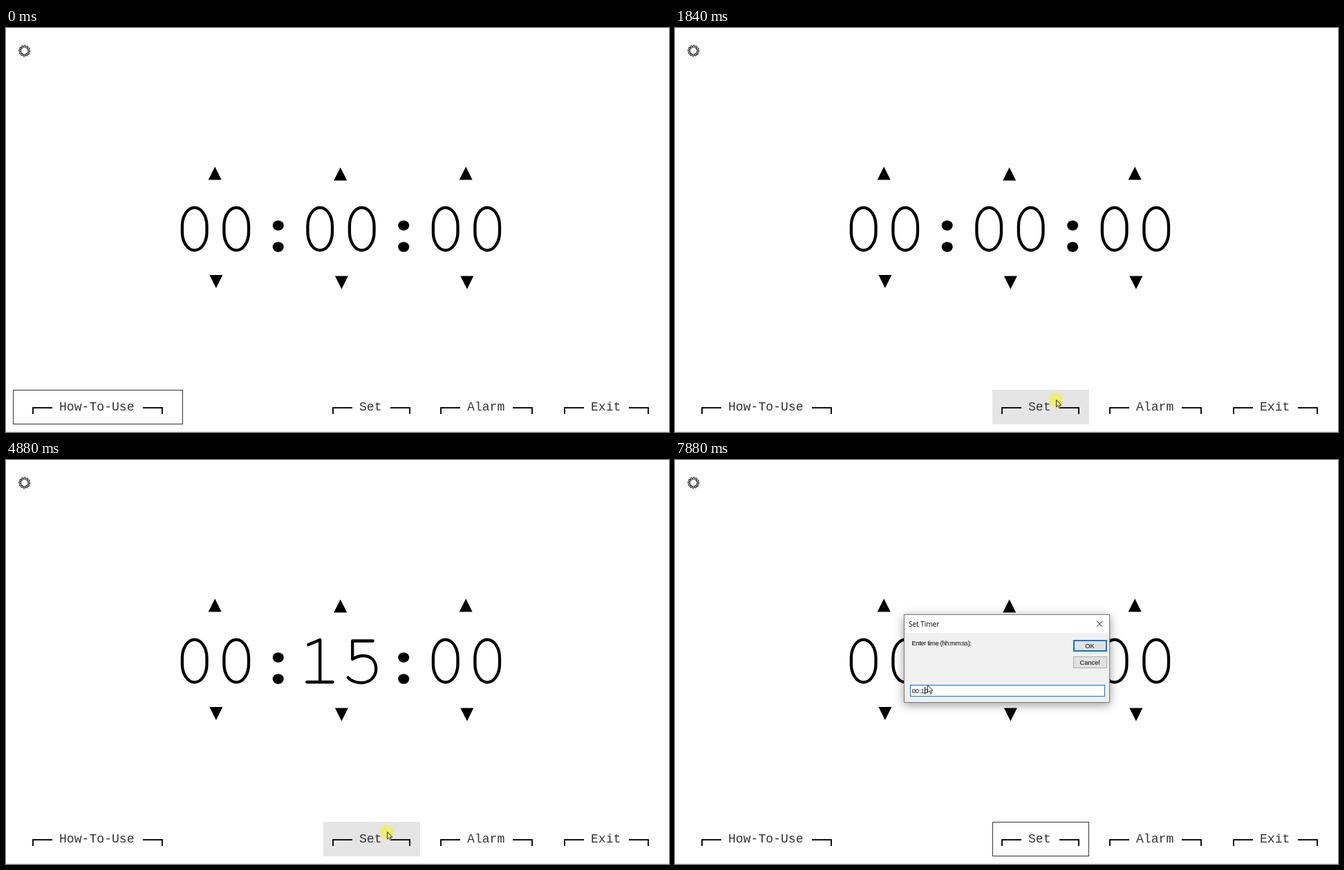
Write an HTML page with a canvas that moves like this. It is 959 px wide and 584 px high and loops after 8000 ms.

```html
<!DOCTYPE html>
<html lang="en">
<head>
<meta charset="utf-8">
<title>Timer</title>
<style>
html, body { margin: 0; width: 100%; height: 100%; overflow: hidden; background: #fff; }
canvas { display: block; width: 959px; height: 584px; }
</style>
</head>
<body>
<canvas id="stage" width="959" height="584"></canvas>
<script>
const ctx = document.getElementById('stage').getContext('2d');
const LOOP = 8000, STEP = 66, CHAR = 10.86;
const MONO = '18.1px "Liberation Mono", monospace';
const SANS = '9.3px "Liberation Sans", sans-serif';
const TITLE = '10px "Open Sans", "Noto Sans", sans-serif';
const BLUE = '#0078d7', GRAY = '#e5e5e5', YELLOW = '#f0ee6e';

// Places the pointer visits
const ENTRY = [880, 571], ABOVE_ALARM = [631, 517], SET = [551, 537], BELOW = [467, 370];
const FIELD = [385, 338], OK = [578, 268], CARET = [367, 329], EDGE = [365, 325];

// Each move runs from the end of the last one through its places
const moves = [
  { from: 330, to: 990, via: [ABOVE_ALARM, SET] },
  { from: 2370, to: 2700, via: [BELOW] },
  { from: 2700, to: 3200, via: [FIELD, OK] },
  { from: 4460, to: 4790, via: [SET] },
  { from: 5080, to: 5600, via: [FIELD] },
  { from: 6130, to: 6500, via: [[375, 352], CARET] },
  { from: 6600, to: 6730, via: [[376, 326]] },
  { from: 7010, to: 7210, via: [EDGE] }
];
const clicks = [1840, 3330, 4860, 5880, 6530];
const PRESS = 130;
const dialogs = [[2040, 3590], [5060, LOOP]];

const button = (name, x, pad = 0) => ({ name, x, pad, w: Math.round(107.5 + name.length * CHAR + pad * 2) });
const buttons = [button('How-To-Use', 10, 15), button('Set', 459), button('Alarm', 615), button('Exit', 794)];

const ease = f => f * (1.6 - 0.6 * f);
const inside = (p, x, y, w, h) => p && p.x >= x && p.x < x + w && p.y >= y && p.y < y + h;

function pointer(t) {
  if (t < moves[0].from) return null;
  let path, start = ENTRY, now;
  for (const m of moves) {
    if (m.from > t) break;
    if (now) start = now.via[now.via.length - 1];
    now = m;
  }
  path = [start, ...now.via];
  const time = Math.floor((t - now.from) / STEP) * STEP;
  const pos = Math.min(1, time / (now.to - now.from)) * now.via.length;
  const leg = Math.min(Math.floor(pos), now.via.length - 1);
  const f = ease(pos - leg), a = path[leg], b = path[leg + 1];
  return { x: Math.round(a[0] + (b[0] - a[0]) * f), y: Math.round(a[1] + (b[1] - a[1]) * f) };
}

function rect(x, y, w, h, color) {
  ctx.fillStyle = color;
  ctx.fillRect(x, y, w, h);
}

function frame(x, y, w, h, color, line = 1) {
  ctx.strokeStyle = color;
  ctx.lineWidth = line;
  ctx.strokeRect(x + line / 2, y + line / 2, w - line, h - line);
}

function text(s, x, y, font, color = '#000', spacing = 0, align = 'left') {
  ctx.font = font;
  ctx.fillStyle = color;
  ctx.textAlign = align;
  ctx.letterSpacing = spacing + 'px';
  ctx.fillText(s, x, y);
}

function stroke(color, line, path) {
  ctx.strokeStyle = color;
  ctx.lineWidth = line;
  ctx.stroke(path);
}

function disc(x, y, rx, ry, color) {
  ctx.fillStyle = color;
  ctx.beginPath();
  ctx.ellipse(x, y, rx, ry, 0, 0, Math.PI * 2);
  ctx.fill();
}

function gear() {
  const p = new Path2D();
  for (let i = 0; i < 48; i++) {
    const a = i / 48 * Math.PI * 2;
    const r = i % 4 < 2 ? 8 : 6.6;
    p.lineTo(26.7 + r * Math.cos(a), 33 + r * Math.sin(a));
  }
  p.closePath();
  p.moveTo(32, 33);
  p.arc(26.7, 33, 5.3, 0, Math.PI * 2);
  stroke('#222', 1.1, p);
}

function triangle(x, y, h) {
  ctx.fillStyle = '#000';
  ctx.beginPath();
  ctx.moveTo(x - 9.5, y);
  ctx.lineTo(x + 9.5, y);
  ctx.lineTo(x, y + h);
  ctx.fill();
}

function arrows() {
  for (let i = 0; i < 3; i++) {
    const x = 302.2 + i * 181.5;
    triangle(x, i === 1 ? 220.5 : 219.5, -19);
    triangle(x + 1.7, i ? 358.5 : 357, 19);
  }
}

const digits = {
  0: 'M-17.8 286a17.8 26.3 0 0 1 35.6 0v9a17.8 26.3 0 0 1 -35.6 0z',
  1: 'M-17 267L0 260V321M-19 321H18.5',
  5: 'M16 261.5H-13.5V288C-9 285 -3 283 2 283C14 283 20.5 291 20.5 302C20.5 314 11 322 -1 322C-9 322 -15 319.5 -20 314.5'
};

function clock(value) {
  ctx.lineCap = ctx.lineJoin = 'round';
  [...value].forEach((c, i) => {
    const x = 272.7 + i * 60.5;
    if (c === ':') {
      disc(x, 285.5, 8, 7.3, '#000');
      disc(x, 316.5, 8, 7.3, '#000');
      return;
    }
    ctx.save();
    ctx.translate(x, 0);
    stroke('#000', 4.3, new Path2D(digits[c]));
    ctx.restore();
  });
  ctx.lineCap = 'butt';
  ctx.lineJoin = 'miter';
}

function bracket(x, tail) {
  rect(x, 548, 29, 2, '#111');
  rect(x + tail, 548, 2, 10, '#111');
}

function drawButton({ name, x, w, pad }, hover, focus) {
  if (hover) rect(x, 523, w, 50, GRAY);
  if (focus) frame(x, 523, w, 50, '#333');
  const left = x + pad;
  bracket(Math.round(left + 12.5), 0);
  bracket(Math.round(left + 64 + name.length * CHAR), 27);
  text(name, left + 52, 553, MONO, '#333');
}

function field(t) {
  rect(340, 325, 282, 17, '#fff');
  frame(340, 325, 282, 17, BLUE);
  const selected = t < 5880;
  if (selected) rect(342, 328, 37, 12, BLUE);
  const value = t < 7610 ? '00:15:00' : t < 7680 ? '00:1500' : t < 7880 ? '00:150' : '00:10';
  text(value, 342.7, 337, SANS, selected ? '#fff' : '#000');
  if (!selected) rect(t < 6530 ? 379 : t < 7880 ? 366 : 361, 328, 1, 11, '#000');
}

function choice(label, y, fill, border, line) {
  rect(576, y, 49, 17, fill);
  frame(576, y, 49, 17, border, line);
  text(label, 600, y + 12, SANS, '#000', 0, 'center');
}

function dialog(t, p) {
  ctx.save();
  ctx.shadowColor = 'rgba(0,0,0,.4)';
  ctx.shadowBlur = 13;
  ctx.shadowOffsetY = 3;
  rect(331, 223, 298, 128, '#f0f0f0');
  ctx.restore();
  rect(331, 223, 298, 27, '#fff');
  frame(331, 223, 298, 128, '#777');
  text('Set Timer', 338, 240.5, TITLE);
  stroke('#222', 1, new Path2D('M610 232.8l8.4 8.4m0 -8.4l-8.4 8.4'));
  text('Enter time (hh:mm:ss):', 342.5, 267.5, SANS, '#000', -0.36);
  choice('OK', 260, inside(p, 576, 261, 49, 16) ? '#e5f1fb' : '#e1e1e1', BLUE, 2);
  choice('Cancel', 284, '#e1e1e1', '#adadad', 1);
  field(t);
}

function drawPointer(p, beam, pressed) {
  ctx.save();
  ctx.translate(p.x, p.y);
  if (pressed) disc(0, 0.5, 10, 10, YELLOW);
  if (beam) {
    stroke('#111', 1, new Path2D('M-2.5 -5.5H-.5M1 -5.5H3M-2.5 5.5H-.5M1 5.5H3M.5 -5V5'));
  } else {
    const arrow = new Path2D('M.5 .5V11L3 8.7L4.8 12.7L6.5 12L4.8 8H8z');
    ctx.fillStyle = pressed ? YELLOW : '#fff';
    ctx.fill(arrow);
    stroke('#222', 0.9, arrow);
  }
  ctx.restore();
}

function draw(t) {
  const p = pointer(t);
  const open = dialogs.some(([a, b]) => t >= a && t < b);
  const focus = t < clicks[0] ? 'How-To-Use' : open ? 'Set' : '';
  rect(0, 0, 959, 584, '#fff');
  rect(0, 583, 959, 1, GRAY);
  gear();
  arrows();
  clock(t < 3590 ? '00:00:00' : '00:15:00');
  for (const b of buttons) {
    drawButton(b, !open && inside(p, b.x, 523, b.w, 50), b.name === focus);
  }
  if (open) dialog(t, p);
  if (p) {
    const pressed = clicks.some(c => t >= c && t < c + PRESS);
    drawPointer(p, open && inside(p, 341, 327, 280, 14), pressed);
  }
}

const begin = performance.now();
function tick() {
  draw((performance.now() - begin) % LOOP);
  requestAnimationFrame(tick);
}
tick();
</script>
</body>
</html>
```
